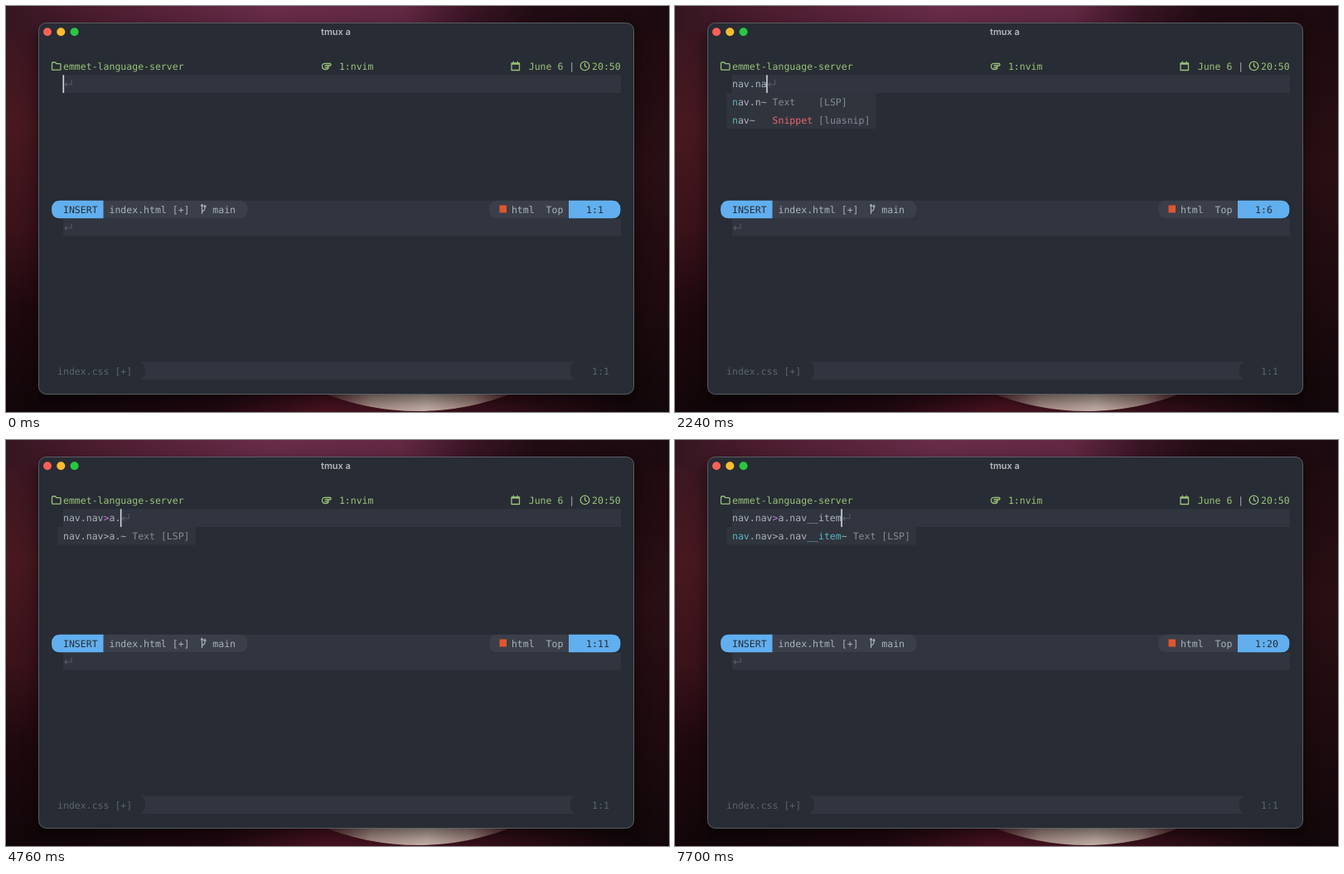
Recreate the animation shown at these times as an HTML page. Size 800 by 490 pixels, loop 8 s.

```html
<!DOCTYPE html>
<html lang="en">
<head>
<meta charset="utf-8">
<title>tmux a</title>
<style>
html, body { margin: 0; width: 100%; height: 100%; overflow: hidden; background: #16080c; }
svg { display: block; width: 800px; height: 490px; }
text { white-space: pre; text-rendering: geometricPrecision; }
.term { font: 11.52px "DejaVu Sans Mono", "Noto Sans Mono", monospace; }
.title { font: 600 11px Inter, Roboto, sans-serif; }
.icon { fill: none; stroke: #98c379; stroke-width: 1.3; stroke-linejoin: round; stroke-linecap: round; }
</style>
</head>
<body>
<svg viewBox="0 0 800 490" xmlns="http://www.w3.org/2000/svg">
  <defs>
    <linearGradient id="top">
      <stop offset="0" stop-color="#351520"/>
      <stop offset=".12" stop-color="#4a1c2e"/>
      <stop offset=".4" stop-color="#682c48"/>
      <stop offset=".6" stop-color="#622842"/>
      <stop offset=".7" stop-color="#3a1525"/>
      <stop offset=".8" stop-color="#210c13"/>
      <stop offset="1" stop-color="#1b0a0f"/>
    </linearGradient>
    <linearGradient id="left" x2="0" y2="1">
      <stop offset="0" stop-color="#371621"/>
      <stop offset=".3" stop-color="#481820"/>
      <stop offset=".55" stop-color="#3a121a"/>
      <stop offset=".75" stop-color="#1e090e"/>
      <stop offset="1" stop-color="#120609"/>
    </linearGradient>
    <linearGradient id="right" x2="0" y2="1">
      <stop offset="0" stop-color="#1c0a0f"/>
      <stop offset=".4" stop-color="#2a0f14"/>
      <stop offset="1" stop-color="#12070a"/>
    </linearGradient>
    <linearGradient id="base">
      <stop offset="0" stop-color="#120609"/>
      <stop offset=".3" stop-color="#200910"/>
      <stop offset=".48" stop-color="#4a1322"/>
      <stop offset=".75" stop-color="#38101b"/>
      <stop offset="1" stop-color="#13070a"/>
    </linearGradient>
    <linearGradient id="moon" gradientUnits="userSpaceOnUse" x1="385" x2="608">
      <stop offset="0" stop-color="#5c2b33"/>
      <stop offset=".25" stop-color="#b39790"/>
      <stop offset=".55" stop-color="#cdb9b0"/>
      <stop offset=".8" stop-color="#a98b85"/>
      <stop offset="1" stop-color="#5a2930"/>
    </linearGradient>
    <filter id="soft" x="-20%" y="-20%" width="140%" height="140%"><feGaussianBlur stdDeviation="10"/></filter>
  </defs>

  <rect width="800" height="490" fill="#16080c"/>
  <rect width="60" height="490" fill="url(#left)"/>
  <rect x="740" width="60" height="490" fill="url(#right)"/>
  <rect x="39" y="455" width="718" height="35" fill="url(#base)"/>
  <rect width="800" height="32" fill="url(#top)"/>
  <circle cx="497" cy="177" r="312" fill="url(#moon)" clip-path="inset(560px 0 0 0)"/>
  <rect x="39" y="28" width="718" height="449" rx="10" fill="#000" opacity=".55" filter="url(#soft)"/>

  <rect x="39.5" y="20.5" width="718" height="448" rx="9" fill="#282c34" stroke="#5a5d63"/>
  <circle cx="50" cy="31.3" r="5" fill="#ff5f57"/>
  <circle cx="66.3" cy="31.3" r="5" fill="#febc2e"/>
  <circle cx="82.6" cy="31.3" r="5" fill="#28c840"/>
  <text class="title" x="398" y="34.8" text-anchor="middle" fill="#b4b6ba">tmux a</text>

  <!-- top bar icons -->
  <g class="icon">
    <path d="M55.5 69q0-1 1-1h3l1.5 1.7h4q1 0 1 1v5.5q0 1-1 1h-8.500q-1 0-1-1z"/>
    <path d="M391.500 69.500h-5.500q-4.500-.5-4.500 3.200 0 3.800 4 3.800 3.500 0 3.500-2l-.5-2.500h3q1.200-1.300 0-2.500zM385 72h3M385 74.300h3"/>
    <path d="M610 69h9.500v8.500h-9.500zM610 70.200h9.500M612.300 67.200v2M617.200 67.200v2"/>
    <circle cx="698.500" cy="72.400" r="5.300"/>
    <path d="M698.500 69.300v3.300l2 1.200"/>
  </g>

  <!-- cursor lines -->
  <path d="M69 83.300H742v21.600H69zM69 256.500H742v21H69z" fill="#31353f"/>

  <!-- status line -->
  <rect x="280" y="234.800" width="320" height="21.500" fill="#31353f"/>
  <path d="M117 234.800h164q10.500 0 10.500 10.700t-10.500 10.800H117zM679 234.800h-85.500q-10.500 0-10.500 10.700t10.500 10.800H679z" fill="#3b3f4a"/>
  <path d="M117.500 234.800H65q-10 0-10 10.700t10 10.800h52.500zM679 234.800h52.500q10 0 10 10.700t-10 10.800H679z" fill="#61afef"/>
  <path d="M236.500 239.500v11.500M236.500 248q3.500-1 3.500-4.500v-2M235 241.500l1.500-2 1.500 2M238.600 242.500l1.400-2 1.400 2" fill="none" stroke="#abb2bf" stroke-width="1.200"/>
  <rect x="595.500" y="240.500" width="8.500" height="9" fill="#e0552f"/>

  <!-- inactive status line -->
  <rect x="163" y="429.500" width="523" height="21.500" fill="#31353f"/>
  <path d="M162 429.500q6 2.500 6 10.700t-6 10.800zM687 429.500q-6.500 2.500-6.500 10.700t6.500 10.800z" fill="#282c34"/>

  <g id="fixed" class="term"></g>
  <g id="live" class="term"></g>
</svg>
<script>
const LOOP = 8000, LAG = 70;
const CELL = 6.935, ROW = 21.65, LEFT = 69, TOP = 83.3;
const INK = '#abb2bf', GREEN = '#98c379', DARK = '#282c34', DIM = '#5c6370',
      GRAY = '#848b98', CYAN = '#56b6c2', PURPLE = '#c678dd', RED = '#e86671';

const typed = 'nav.nav>a.nav__item';
const keys = [980, 1120, 1260, 1400, 2030, 2240, 2450, 2800, 3290, 4340,
              4830, 5040, 5250, 6160, 6300, 6440, 6650, 6860, 7420];

const fixed = document.getElementById('fixed');
const live = document.getElementById('live');

function add(parent, tag, attrs) {
  const el = document.createElementNS('http://www.w3.org/2000/svg', tag);
  for (const k in attrs) el.setAttribute(k, attrs[k]);
  return parent.appendChild(el);
}

// Text at a column and row of the editor grid.
function put(parent, col, row, str, fill) {
  if (!str) return;
  const x = LEFT + col * CELL, y = TOP + row * ROW + 15;
  add(parent, 'text', { x, y, fill }).textContent = str;
}

function eol(parent, x, y) {
  add(parent, 'path', {
    d: `M${x + 10} ${y + 6}v5.500h-8M${x + 4.500} ${y + 9}l-2.500 2.500 2.500 2.500`,
    fill: 'none', stroke: '#555b67', 'stroke-width': 1.1
  });
}

function label(row, str, heads, tail) {
  const end = str.length - tail;
  put(live, 0, row, str.slice(0, heads), CYAN);
  put(live, heads, row, str.slice(heads, end), INK);
  put(live, end, row, str.slice(end), CYAN);
  put(live, str.length, row, '~', INK);
}

function menu(str) {
  if (!str) return;
  const word = str.match(/\w*$/)[0];
  const snip = word && 'nav'.startsWith(word);
  const wide = Math.max(str.length, snip ? 3 : 0) + 2;
  const kind = snip ? 8 : 5;
  const cols = wide + kind + (snip ? 9 : 5) + 2;
  add(live, 'rect', {
    x: LEFT - CELL, y: TOP + ROW, width: cols * CELL,
    height: ROW * (snip ? 2 : 1), fill: '#30343d'
  });
  let head = 0;
  while (head < word.length && word[head] === str[head]) head++;
  label(1, str, head, word.length - head);
  put(live, wide, 1, 'Text', GRAY);
  put(live, wide + kind, 1, '[LSP]', GRAY);
  if (snip) {
    label(2, 'nav', word.length, 0);
    put(live, wide, 2, 'Snippet', RED);
    put(live, wide + kind, 2, '[luasnip]', GRAY);
  }
}

function draw(count, seen) {
  live.replaceChildren();
  const str = typed.slice(0, count);
  put(live, 0, 0, str.slice(0, 7), INK);
  put(live, 7, 0, str.slice(7, 8), PURPLE);
  put(live, 8, 0, str.slice(8), INK);
  const x = LEFT + count * CELL;
  eol(live, x, TOP);
  add(live, 'rect', { x: x - .5, y: TOP, width: 1.6, height: ROW, fill: '#d3d7df' });
  menu(typed.slice(0, seen));
  put(live, 91, 7, '1:' + (seen + 1), DARK);
}

[
  [0, -1, 'emmet-language-server', GREEN],
  [48, -1, '1:nvim', GREEN],
  [81, -1, 'June 6', GREEN],
  [88, -1, '|', INK],
  [92, -1, '20:50', GREEN],
  [0, 7, 'INSERT', DARK],
  [8, 7, 'index.html [+]', INK],
  [26, 7, 'main', INK],
  [78, 7, 'html', INK],
  [84, 7, 'Top', INK],
  [-1, 16, 'index.css [+]', DIM],
  [92, 16, '1:1', DIM]
].forEach(item => put(fixed, ...item));
eol(fixed, LEFT, TOP + 8 * ROW);

const pressed = t => keys.filter(k => k <= t).length;
let last = '';
function tick(now) {
  const t = now % LOOP;
  const count = pressed(t), seen = pressed(t - LAG);
  const state = count + '/' + seen;
  if (state !== last) {
    draw(count, seen);
    last = state;
  }
  requestAnimationFrame(tick);
}
draw(0, 0);
requestAnimationFrame(tick);
</script>
</body>
</html>
```
